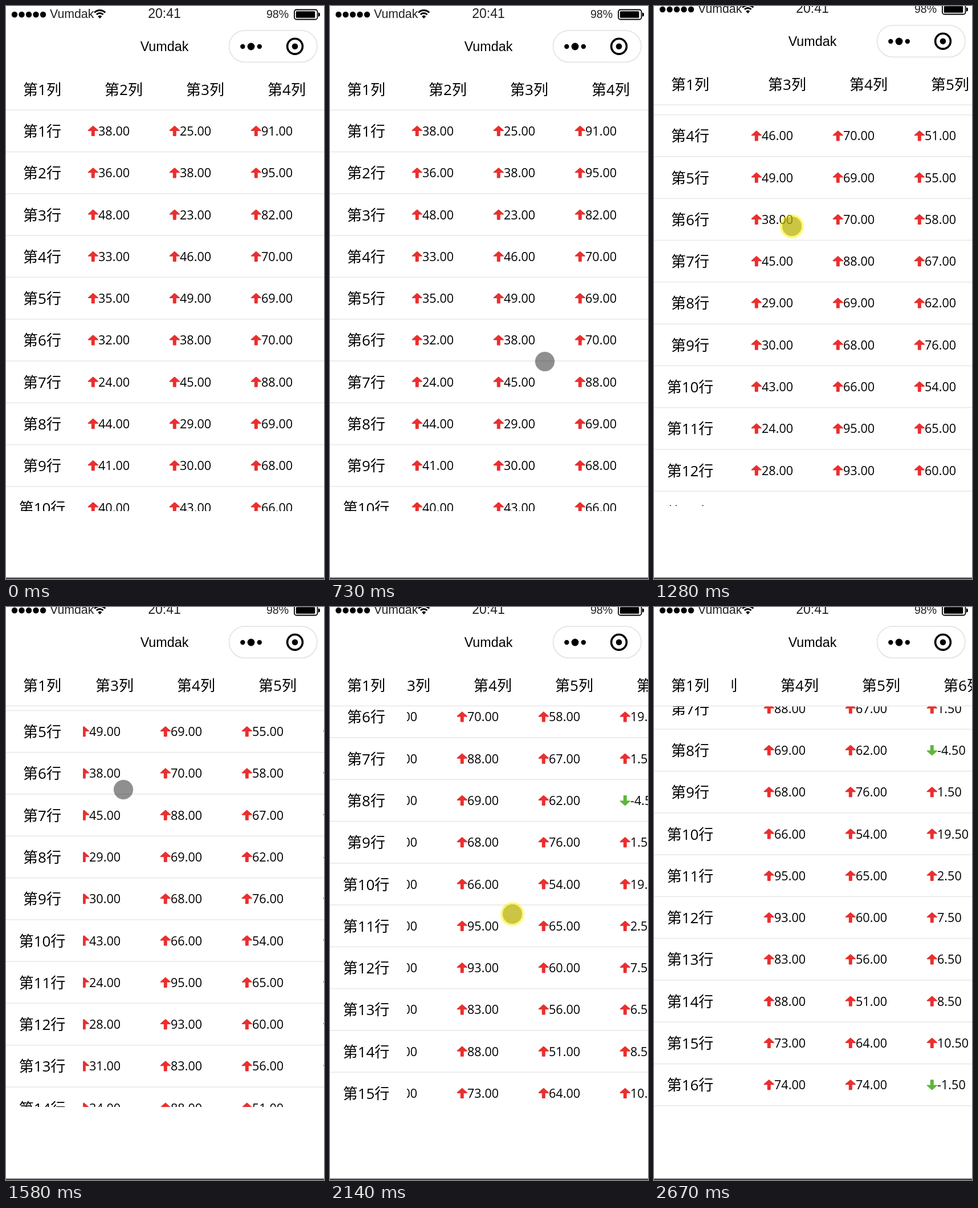
These frames come from a looping animation (558x1004 px, 4.09 s). An HTML page with a canvas:

```html
<!DOCTYPE html>
<html lang="zh-CN">
<head>
<meta charset="utf-8">
<title>表格滚动</title>
<style>
html, body { margin: 0; width: 100%; height: 100%; overflow: hidden; background: #fff; }
canvas { display: block; }
</style>
</head>
<body>
<canvas id="stage" width="558" height="1004"></canvas>
<script>
const ctx = document.getElementById('stage').getContext('2d');
const W = 558, H = 1004, LOOP = 4090;
const APP = 'Vumdak';
const TABLE = '"Open Sans", "Noto Sans CJK SC", "Noto Sans CJK", sans-serif';
const UI = '"Liberation Sans", Arial, sans-serif';

const HEAD_LINE = 182.3, ROW = 73.28, COL = 143, FROZEN = 135, BOTTOM = 885;
const COLUMNS = [
  [38, 36, 48, 33, 35, 32, 24, 44, 41, 40, 37, 29, 42, 31, 45, 34],
  [25, 38, 23, 46, 49, 38, 45, 29, 30, 43, 24, 28, 31, 34, 27, 33],
  [91, 95, 82, 70, 69, 70, 88, 69, 68, 66, 95, 93, 83, 88, 73, 74],
  [57, 61, 53, 51, 55, 58, 67, 62, 76, 54, 65, 60, 56, 51, 64, 74],
  [4.5, 9.5, 3.5, 8.5, 5.5, 19.5, 1.5, -4.5, 1.5, 19.5, 2.5, 7.5, 6.5, 8.5, 10.5, -1.5]
];

// The picture advances in bursts of seven even steps: [start, end]
const BURSTS = [[270, 730], [970, 1440], [1580, 2040], [2140, 2590]];
const HIDE = 2670;
const STEPS = BURSTS.flatMap(([a, b]) =>
  Array.from({ length: 7 }, (_, k) => Math.round((a + k * (b - a) / 6) / 10) * 10));

// time, x, y
const POINTER = [
  [270, 451, 992], [350, 415, 880], [500, 318, 680], [580, 326, 632], [650, 352, 614],
  [730, 377, 623], [970, 374, 616], [1050, 337, 538], [1280, 242, 386], [1440, 200, 306],
  [1580, 206, 320], [1960, 372, 648], [2040, 362, 624], [2140, 320, 538],
  [2290, 288, 450], [2370, 292, 480], [2590, 437, 928]
];
// time, table x, table y, page y
const SCROLL = [
  [970, 0, 0, 0], [1050, 0, 0, 3.5], [1130, 30, 55, 9], [1280, 116, 202.5, 9],
  [1440, 152, 274, 9], [1580, 159, 285, 9], [1960, 159, 285, 9],
  [2040, 163, 296, 9], [2140, 207, 384, 9], [2290, 237, 472, 9]
];

function sample(keys, t) {
  const i = keys.findIndex(k => k[0] > t);
  if (i === 0) return keys[0].slice(1);
  if (i < 0) return keys[keys.length - 1].slice(1);
  const a = keys[i - 1], b = keys[i], p = (t - a[0]) / (b[0] - a[0]);
  return a.slice(1).map((v, n) => v + (b[n + 1] - v) * p);
}

function text(s, x, y, size, family, align = 'left', color = '#000') {
  ctx.font = `${size}px ${family}`;
  ctx.textAlign = align;
  ctx.fillStyle = color;
  ctx.fillText(s, x, y);
}

function disc(x, y, r, color = '#000') {
  ctx.fillStyle = color;
  ctx.beginPath();
  ctx.arc(x, y, r, 0, 7);
  ctx.fill();
}

function box(x, y, w, h, r) {
  ctx.beginPath();
  ctx.roundRect(x, y, w, h, r);
}

function line(y) {
  ctx.fillStyle = '#ebebeb';
  ctx.fillRect(0, y - 0.9, W, 1.8);
}

function clipped(x, y, w, h, paint) {
  ctx.save();
  ctx.beginPath();
  ctx.rect(x, y, w, h);
  ctx.clip();
  paint();
  ctx.restore();
}

function arrow(x, y, up) {
  ctx.save();
  ctx.translate(x, y);
  if (!up) ctx.scale(1, -1);
  ctx.fillStyle = ctx.strokeStyle = up ? '#ea2f2f' : '#5fb53c';
  ctx.lineWidth = 1.6;
  ctx.lineJoin = 'round';
  ctx.beginPath();
  for (const [px, py] of [[0, -8.4], [8.4, -0.9], [2.2, -0.9], [2.2, 8.2], [-2.2, 8.2], [-2.2, -0.9], [-8.4, -0.9]])
    ctx.lineTo(px, py);
  ctx.closePath();
  ctx.fill();
  ctx.stroke();
  ctx.restore();
}

function statusBar() {
  for (let i = 0; i < 5; i++) disc(15 + i * 12.5, 15, 5.2);
  text(APP, 77, 20.7, 21.3, UI, 'left', '#222');
  ctx.strokeStyle = '#000';
  ctx.lineWidth = 2.8;
  for (const r of [13, 8]) {
    ctx.beginPath();
    ctx.arc(164.7, 20.5, r, -Math.PI * 0.76, -Math.PI * 0.24);
    ctx.stroke();
  }
  ctx.fillStyle = '#000';
  ctx.beginPath();
  ctx.moveTo(164.7, 22);
  ctx.arc(164.7, 21, 4.5, -Math.PI * 0.78, -Math.PI * 0.22);
  ctx.fill();

  text('20:41', 278, 21.3, 23, UI, 'center', '#222');
  text('98%', 457, 21, 19.5, UI, 'left', '#222');
  ctx.lineWidth = 1.8;
  box(506, 6.5, 40.5, 17, 3.5);
  ctx.stroke();
  ctx.fillStyle = '#000';
  box(508.8, 9.3, 33.5, 11.4, 1.5);
  ctx.fill();
  box(548, 11.5, 3, 7, [0, 3, 3, 0]);
  ctx.fill();
}

function titleBar() {
  text(APP, 278, 79, 23.3, UI, 'center');
  ctx.strokeStyle = '#e5e5e5';
  ctx.lineWidth = 1.8;
  box(391.5, 42.8, 154.5, 55.6, 27.8);
  ctx.stroke();
  disc(415.3, 71, 4.2);
  disc(430, 71, 6.4);
  disc(444.8, 71, 4.2);
  ctx.strokeStyle = '#000';
  ctx.lineWidth = 3.6;
  ctx.beginPath();
  ctx.arc(507, 70.7, 13.4, 0, 7);
  ctx.stroke();
  disc(507, 70.7, 5.3);
}

function table(sx, sy) {
  text('第1列', 63.5, 155.5, 26, TABLE, 'center');
  clipped(FROZEN, 110, W, 72, () => {
    COLUMNS.forEach((_, c) => text(`第${c + 2}列`, 206.5 + c * COL - sx, 155.5, 26, TABLE, 'center'));
  });
  line(HEAD_LINE);
  clipped(0, HEAD_LINE + 0.9, W, BOTTOM - HEAD_LINE - 0.9, () => {
    COLUMNS[0].forEach((_, r) => {
      const top = HEAD_LINE + r * ROW - sy;
      text(`第${r + 1}行`, 63.5, top + 46.7, 26, TABLE, 'center');
      line(top + ROW);
    });
    clipped(FROZEN, 0, W, H, () => COLUMNS.forEach((values, c) => values.forEach((v, r) => {
      const x = 144 + c * COL - sx, top = HEAD_LINE + r * ROW - sy;
      arrow(x + 8.8, top + 36.8, v > 0);
      text(v.toFixed(2), x + 18, top + 44.7, 21.6, TABLE);
    })));
  });
}

function pointer(t) {
  if (t < BURSTS[0][0] || t >= HIDE) return;
  const [x, y] = sample(POINTER, t);
  const pressed = (t >= 970 && t < 1580) || (t >= 2040 && t < 2370);
  disc(x, y, 18, 'rgba(0,0,0,0.05)');
  disc(x, y, 17, 'rgba(0,0,0,0.41)');
  if (pressed) disc(x, y, 21, 'rgba(255,245,0,0.53)');
}

function draw(now) {
  const time = now % LOOP;
  const t = time >= HIDE ? HIDE : Math.max(0, ...STEPS.filter(s => s <= time));
  const [sx, sy, page] = sample(SCROLL, t);
  ctx.fillStyle = '#fff';
  ctx.fillRect(0, 0, W, H);
  ctx.save();
  ctx.translate(0, -page);
  statusBar();
  titleBar();
  table(sx, sy);
  ctx.restore();
  ctx.fillStyle = '#444';
  ctx.fillRect(0, 1001.5, W, 2.5);
  pointer(t);
}

const start = performance.now();
function tick() {
  draw(performance.now() - start);
  requestAnimationFrame(tick);
}
tick();
</script>
</body>
</html>
```
